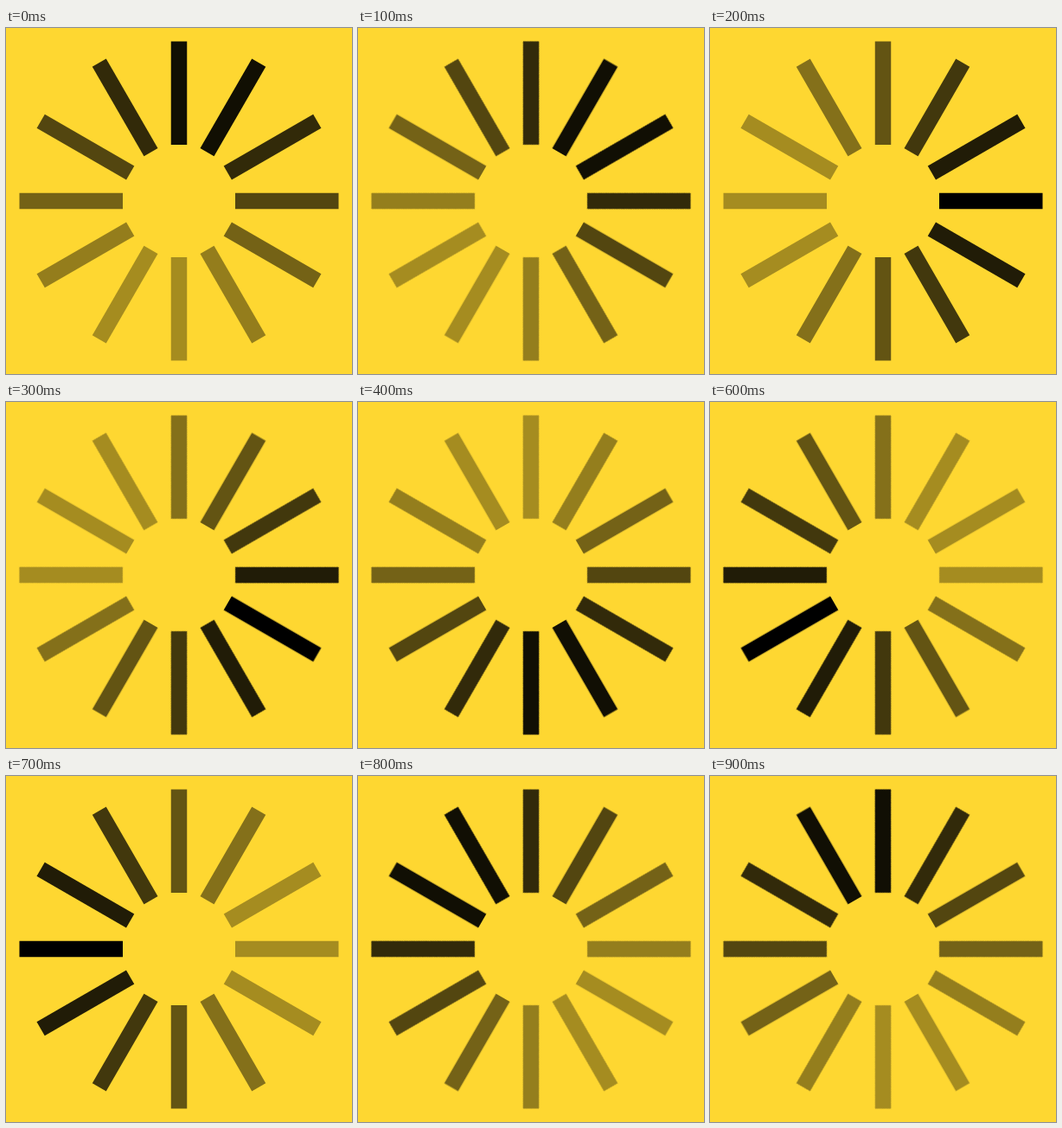
Animation of 400 by 400 pixels, one loop 1 s. Source, as an HTML page without scripts:

```html
<!DOCTYPE html>
<html lang="en">
<head>
<meta charset="utf-8">
<title>Loading spinner</title>
<style>
  html, body { margin: 0; height: 100%; overflow: hidden; background: #fed731; }
  svg { display: block; width: 100vw; height: 100vh; }

  /* Bars fade linearly with their distance from the darkest point, --peak */
  rect {
    x: -9.25px; y: -184.5px; width: 18.5px; height: 119.5px;
    transform: rotate(calc(var(--i) * 30deg));
    opacity: max(.35, 1 - .13 * max(var(--i) - var(--peak), var(--peak) - var(--i)));
  }

  /* Two wheels take turns: darkest between two bars, or on one bar */
  .between { --peak: .5; animation: between 1s step-end infinite; }
  .on { --peak: 0; animation: on 1s step-end infinite; }

  @keyframes between {
    0% { transform: rotate(0deg); opacity: 1; }
    10% { transform: rotate(30deg); opacity: 1; }
    20% { transform: rotate(30deg); opacity: 0; }
    40% { transform: rotate(150deg); opacity: 1; }
    50% { transform: rotate(180deg); opacity: 1; }
    60% { transform: rotate(180deg); opacity: 0; }
    80% { transform: rotate(300deg); opacity: 1; }
    90%, 100% { transform: rotate(330deg); opacity: 1; }
  }
  @keyframes on {
    0% { transform: rotate(90deg); opacity: 0; }
    20% { transform: rotate(90deg); opacity: 1; }
    30% { transform: rotate(120deg); opacity: 1; }
    40% { transform: rotate(120deg); opacity: 0; }
    60% { transform: rotate(240deg); opacity: 1; }
    70% { transform: rotate(270deg); opacity: 1; }
    80%, 100% { transform: rotate(270deg); opacity: 0; }
  }
</style>
</head>
<body>
<svg viewBox="0 0 400 400">
  <defs>
    <g id="wheel">
      <rect style="--i:-5"/>
      <rect style="--i:-4"/>
      <rect style="--i:-3"/>
      <rect style="--i:-2"/>
      <rect style="--i:-1"/>
      <rect style="--i:0"/>
      <rect style="--i:1"/>
      <rect style="--i:2"/>
      <rect style="--i:3"/>
      <rect style="--i:4"/>
      <rect style="--i:5"/>
      <rect style="--i:6"/>
    </g>
  </defs>
  <g transform="translate(200 200)">
    <g class="between"><use href="#wheel"/></g>
    <g class="on"><use href="#wheel"/></g>
  </g>
</svg>
</body>
</html>
```
